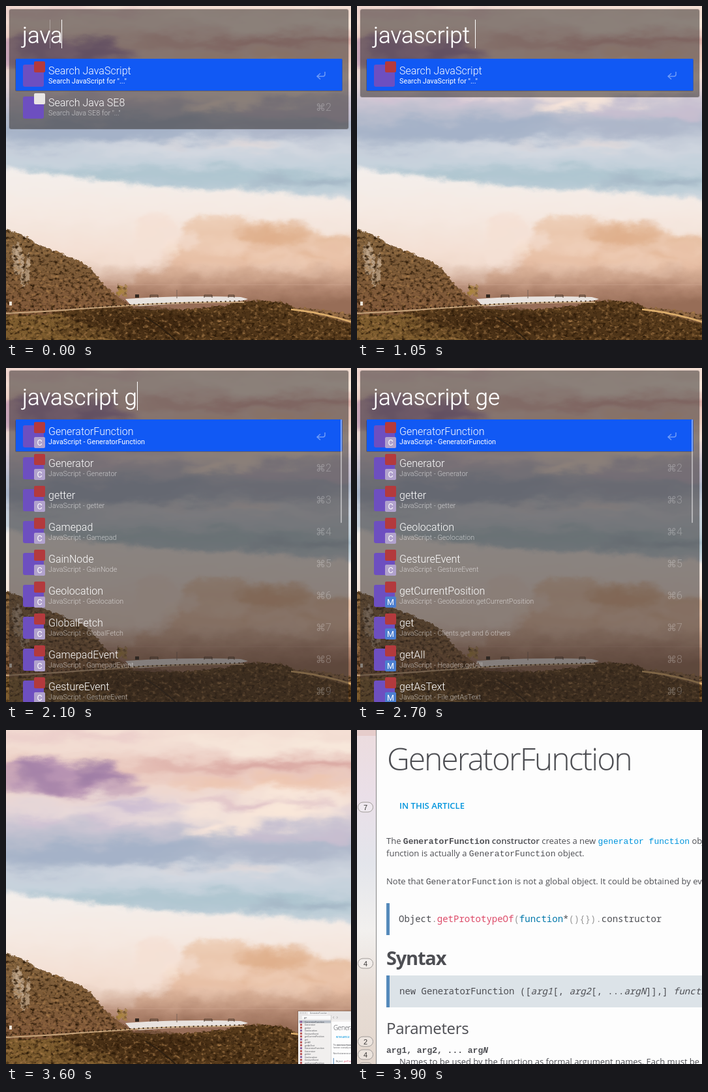
An HTML page for the animation above (6.91 s loop, 529 by 513 pixels).

```html
<!DOCTYPE html>
<html lang="en">
<head>
<meta charset="utf-8">
<title>Launcher search</title>
<style>
  html, body { margin: 0; width: 529px; height: 513px; overflow: hidden; background: #f5ebe4; }
  svg { position: absolute; left: 0; top: 0; width: 529px; height: 513px; overflow: hidden; }
  #wallpaper { will-change: transform; }
  text { white-space: pre; }
  .ui { font-family: Roboto, "Liberation Sans", sans-serif; font-weight: 300; fill: #fff; }
  .doc { font-family: "Open Sans", "Noto Sans", sans-serif; fill: #4d4e53; }
  .mono { font-family: "Liberation Mono", monospace; }
  .code { font-family: "Noto Sans Mono", "DejaVu Sans Mono", monospace; font-size: 14px; }
  .link { fill: #0095dd; }
</style>
</head>
<body>
<svg id="wallpaper" viewBox="0 0 529 513">
  <defs>
    <filter id="cloud" x="-60" y="-60" width="650" height="640" filterUnits="userSpaceOnUse" color-interpolation-filters="sRGB">
      <feGaussianBlur in="SourceGraphic" stdDeviation="4" result="soft"/>
      <feTurbulence type="fractalNoise" baseFrequency=".016 .04" numOctaves="4" seed="4" result="noise"/>
      <feDisplacementMap in="soft" in2="noise" scale="30" xChannelSelector="R" yChannelSelector="G"/>
    </filter>
    <filter id="haze" x="-40" y="200" width="610" height="340" filterUnits="userSpaceOnUse" color-interpolation-filters="sRGB">
      <feGaussianBlur in="SourceGraphic" stdDeviation="3" result="soft"/>
      <feTurbulence type="fractalNoise" baseFrequency=".03 .05" numOctaves="4" seed="9" result="noise"/>
      <feDisplacementMap in="soft" in2="noise" scale="18" xChannelSelector="R" yChannelSelector="G"/>
    </filter>
    <filter id="scrub" x="-20" y="320" width="570" height="220" filterUnits="userSpaceOnUse" color-interpolation-filters="sRGB">
      <feTurbulence type="fractalNoise" baseFrequency=".16 .22" numOctaves="4" seed="8" result="noise"/>
      <feDisplacementMap in="SourceGraphic" in2="noise" scale="7" xChannelSelector="R" yChannelSelector="G" result="shape"/>
      <feColorMatrix in="noise" values="0 0 0 0 .17  0 0 0 0 .1  0 0 0 0 .03  3 0 0 0 -1.45"/>
      <feComposite in2="shape" operator="in" result="dark"/>
      <feColorMatrix in="noise" values="0 0 0 0 .68  0 0 0 0 .5  0 0 0 0 .3  0 2.6 0 0 -1.4"/>
      <feComposite in2="shape" operator="in" result="light"/>
      <feMerge><feMergeNode in="shape"/><feMergeNode in="dark"/><feMergeNode in="light"/></feMerge>
    </filter>
  </defs>
</svg>
<svg id="stage" viewBox="0 0 529 513"></svg>

<script>
const LOOP = 6910;
const wallpaper = document.getElementById('wallpaper');
const stage = document.getElementById('stage');

const times = (n, fn) => Array.from({ length: n }, (_, i) => fn(i)).join('');
const rect = (x, y, w, h, fill, more = '') =>
  `<rect x="${x}" y="${y}" width="${w}" height="${h}" fill="${fill}" ${more}/>`;
const path = (d, fill, more = '') => `<path d="${d}" fill="${fill}" ${more}/>`;
const line = (d, color, width = 1, more = '') =>
  path(d, 'none', `stroke="${color}" stroke-width="${width}" ${more}`);
const label = (x, y, size, content, more = '') =>
  `<text x="${x}" y="${y}" font-size="${size}" ${more}>${content}</text>`;
const span = (content, more) => `<tspan ${more}>${content}</tspan>`;

// Evenly spaced color stops from y1 to y2.
const fade = (id, y1, y2, ...colors) =>
  `<linearGradient id="${id}" x2="0" y1="${y1}" y2="${y2}" gradientUnits="userSpaceOnUse">${
    colors.map((c, i) => `<stop offset="${i / (colors.length - 1)}" stop-color="${c}"/>`).join('')}</linearGradient>`;

let seed = 11;
const random = () => (seed = seed * 16807 % 2147483647) / 2147483647;
const around = (center, spread) => center + spread * (random() * 2 - 1);

// A drift of random streaks inside the ellipse-like area (x ± w, y ± h).
const drift = (color, x, y, w, h, count = 12, opacity = .6) => times(count, () =>
  `<ellipse cx="${around(x, w * .75)}" cy="${around(y, h * .7)}" rx="${w * around(.3, .12)}" ry="${h * around(.4, .15)}"
    fill="${color}" opacity="${opacity}"/>`);

function drawSky() {
  return `${fade('sky', 0, 300, '#f4dfd4', '#f2dcd2', '#e7c2b8', '#f0d8ce', '#e6d6d8',
      '#c9c4d2', '#aeb8ca', '#c6cdd9', '#c8d3dd', '#b2c7d2', '#ccd6de')}
    <g filter="url(#cloud)">
      ${rect(-60, -60, 650, 420, 'url(#sky)')}
      ${drift('#ebcdca', 110, 10, 130, 12)}
      ${drift('#f9eadc', 400, 24, 150, 14)}
      ${drift('#d6a09b', 390, 56, 190, 9)}
      ${drift('#b692b2', 90, 72, 140, 30, 16)}
      ${drift('#9f7da5', 85, 72, 90, 22, 8)}
      ${drift('#efc3aa', 410, 82, 140, 10)}
      ${drift('#fae8db', 400, 115, 150, 30, 16)}
      ${drift('#d6b3c0', 390, 114, 110, 9, 6)}
      ${drift('#cdbfd4', 110, 128, 150, 18, 14)}
      ${drift('#ecdcda', 160, 128, 140, 14, 10)}
      ${drift('#fbe8da', 330, 150, 60, 13)}
      ${drift('#c9bed1', 450, 165, 100, 14)}
      ${drift('#a5b2c8', 130, 188, 180, 28, 18)}
      ${drift('#adb6ca', 400, 190, 160, 11)}
      ${drift('#d4d9e1', 340, 222, 230, 13, 14)}
      ${drift('#ecdcd7', 330, 214, 110, 5, 6)}
      ${drift('#b0c6d1', 280, 258, 290, 10, 14)}
      ${drift('#a2b2c4', 440, 267, 90, 9, 8)}
    </g>`;
}

function drawMist() {
  return `${fade('mist', 250, 440, '#f4efec', '#f5eae3', '#f4e0d4', '#ecd0bf')}
    ${fade('slope', 320, 430, '#eed0ba', '#eac6ac', '#e8c0a6', '#d2a88f')}
    ${fade('valley', 395, 455, '#b58a7400', '#c097807a', '#ac806ad8', '#976d57')}
    <g filter="url(#haze)">
      ${path('M-40 249Q100 258 190 271T360 284T570 304V540H-40Z', 'url(#mist)')}
      ${path('M150 470L290 322Q350 320 400 330Q460 338 570 371V480Z', 'url(#slope)')}
      ${drift('#f6e2d5', 245, 362, 60, 48, 14)}
      ${drift('#dfae8c', 440, 370, 100, 36, 14, .4)}
      ${drift('#f0d3bf', 400, 385, 130, 32, 8, .4)}
      ${rect(100, 395, 470, 120, 'url(#valley)')}
    </g>`;
}

function drawGround() {
  const bench = (x, w) => line(`M${x} 444h${w}v4m${-w} 0v-4m0 2h${w}`, '#4f3a2c');
  return `${fade('hill', 343, 470, '#83643f', '#7c5a37', '#82593a')}
    <g filter="url(#scrub)">
      ${path('M440 463Q490 465 540 476V530H440Z', '#8e6743')}
      ${path('M-20 340L0 343Q28 349 44 364Q76 376 106 389Q130 398 143 420Q164 444 195 462L180 480H-20Z', 'url(#hill)')}
      ${path('M70 471Q130 460 200 465T340 459Q385 447 432 457L445 468L540 490V530H70Z', '#563a1b')}
      ${path('M-20 474H80Q110 486 160 500L185 530H-20Z', '#7d5c2e')}
      ${drift('#402a12', 290, 488, 190, 24, 14, .35)}
      ${drift('#c2a98f', 24, 398, 16, 36, 9, .7)}
      ${drift('#a8843c', 176, 437, 10, 10, 8)}
    </g>
    ${line('M150 428H529', '#d0aa94', 1, 'opacity=".5"')}
    ${path('M183 450Q270 444 360 447L371 450Q360 455 312 456Q250 457 205 461L190 458Z', '#e8e2de')}
    ${line('M0 472Q70 469 115 465L190 460Q250 455 365 455', '#c7a57c', 2)}
    ${line('M0 468Q70 466 115 463L190 459Q250 456 365 453', '#3b2815', 2, 'stroke-dasharray="2 5"')}
    ${line('M437 466Q480 470 529 485', '#dfb06d', 2.5)}
    ${line('M214 478Q240 494 260 513', '#2d1f10', 2)}
    ${line('M262 436v13', '#7b6558')}
    ${rect(198, 443, 6, 5, '#32271f')}${rect(5, 454, 4, 6, '#eee5d8')}
    ${bench(221, 12)}${bench(304, 12)}${bench(341, 9)}`;
}

wallpaper.insertAdjacentHTML('beforeend', drawSky() + drawMist() + drawGround());

const badge = (x, y, fill, letter = '') => rect(x, y, 17, 17, fill, 'rx="2"') +
  (letter && label(x + 8.5, y + 13, 12.5, letter, 'text-anchor="middle" font-weight="400"'));

function drawRow(top, i, { title, sub, tag = '#b33a3d', kind }) {
  const y = top + i * 49;
  const selected = i === 0;
  const highlight = rect(14, y + 1, 502, 49, '#1b1a2a', 'opacity=".3" rx="2"') + rect(15, y, 500.5, 49, '#1159f4', 'rx="1"');
  const hint = selected
    ? line(`M489 ${y + 20}v4q0 3-3 3H477m5-4.5-5 4.5 5 4.5`, '#fff', 1.5, 'opacity=".4"')
    : label(475, y + 30.5, 16, `<tspan font-family="DejaVu Sans, sans-serif" font-size="15">⌘</tspan>${i + 1}`, 'opacity=".27"');
  return (selected ? highlight : '') +
    rect(26, y + 9, 32, 34, '#6d4fc0', 'rx="3"') +
    badge(43, y + 4, tag) +
    (kind ? badge(43, y + 27, kind === 'C' ? '#b1a2cd' : '#4c7fd0', kind) : '') +
    label(65, y + 23.5, 16, title) +
    label(65, y + 37.5, 10.8, sub, selected ? 'font-weight="400"' : 'opacity=".62"') + hint;
}

function drawPanel({ query, caret, ghost, top, height, rows, scroll }) {
  const bar = (x, opacity) => x ? rect(x, 21, 1, 44, '#fff', `opacity="${opacity}"`) : '';
  return `<g class="ui">
    ${rect(4, top - 1, 522, height + 2, '#1e1a1a', 'opacity=".1" rx="4"')}
    ${rect(5, top, 520, height, '#2e2a29', 'opacity=".48" rx="3"')}
    ${label(25, 56.5, 35, query, 'stroke="#fff" stroke-width=".3"')}
    ${bar(ghost, .3)}${bar(caret, 1)}
    ${rows.map((row, i) => drawRow(top === 4 ? 79 : 81, i, row)).join('')}
    ${scroll ? rect(513, 79, 2, 159, '#fff', 'opacity=".45" rx="1"') : ''}
  </g>`;
}

function drawArticle() {
  const punct = s => span(s, 'fill="#999"');
  const italic = s => span(s, 'font-style="italic"');
  const name = (more = '') => span('GeneratorFunction', `class="mono" ${more}`);
  return `<g class="doc">
    ${rect(30, 0, 499, 513, '#fdfdfd')}
    ${label(46, 62, 48, 'GeneratorFunction', 'font-weight="300" letter-spacing="-2"')}
    ${label(65, 121, 13, 'IN THIS ARTICLE', 'font-weight="600" class="link"')}
    ${label(45, 175, 13, `The ${name('font-weight="700"')}${span(' constructor', 'font-weight="600"')} creates a new ${span('generator function', 'class="mono link"')} object. A`)}
    ${label(45, 194, 13, `function is actually a ${name()} object.`)}
    ${label(45, 237, 13, `Note that ${name()} is not a global object. It could be obtained by evaluating`)}
    ${rect(45, 266, 5, 49, '#558abb')}
    ${label(64, 295, 14, `Object${punct('.')}${span('getPrototypeOf', 'fill="#dd4a68"')}${punct('(')}${span('function', 'fill="#0077aa"')}*${punct('(){}).')}constructor`, 'class="code"')}
    ${label(45, 361, 29, 'Syntax', 'font-weight="700" letter-spacing="-1.2"')}
    ${rect(45, 377, 484, 49, '#dce3e8')}${rect(45, 377, 5, 49, '#558abb')}
    ${label(65, 406, 14, `new GeneratorFunction ([${italic('arg1')}[, ${italic('arg2')}[, ...${italic('argN')}]],] ${italic('functionBody')})`, 'class="code"')}
    ${label(45, 467, 24, 'Parameters', 'letter-spacing="-.3"')}
    ${label(45, 496, 13, `arg1, arg2, ... arg${italic('N')}`, 'class="mono" font-weight="700"')}
    ${label(65, 514, 13, 'Names to be used by the function as formal argument names. Each must be')}
  </g>`;
}

function drawReader(tinted) {
  const countByLine = { 0: 7, 12: 4, 18: 2, 19: 4, 20: 3 };
  const counter = ([row, n]) => {
    const y = 118.5 + row * 20;
    return rect(1.5, y - 7.5, 23, 15, '#fff', 'fill-opacity=".3" stroke="#a09b98" rx="7.5"') +
      label(13, y + 4, 11, n, 'text-anchor="middle" fill="#3c3a39" font-family="Liberation Sans, sans-serif"');
  };
  return fade('tint', 0, 513, '#ecdcde', '#eadfe8', '#e3e5eb', '#f2f0ee', '#e7dcd4', '#e3d7ce') +
    rect(0, 0, 30, 513, tinted ? 'url(#tint)' : '#efeeee') +
    (tinted ? rect(0, 0, 29, 9, '#e6cdcb') : '') +
    Object.entries(countByLine).map(counter).join('') +
    drawArticle() + rect(29, 0, 1, 513, '#858585');
}

function drawOpening() {
  return `${rect(447, 431, 83, 83, '#000', 'opacity=".18"')}
    ${rect(448, 432, 82, 82, '#f1efee')}
    <g transform="translate(492.3 448) scale(.21)">${drawArticle()}</g>
    ${rect(448, 432, 81, 13, '#e9e7e7')}
    ${rect(463, 433, 30, 4, '#f8f8f8')}
    ${times(3, i => `<circle cx="${452 + i * 3.5}" cy="434.5" r="1" fill="#c9c7c6"/>`)}
    <g class="doc">
      ${label(466, 436, 3, 'GeneratorFunction')}
      ${rect(454, 439, 44, 5, '#fafafa')}${label(457, 443, 4, 'ge')}
      ${rect(449, 446, 49, 4.3, '#b9bfc8')}
      ${times(15, i => rect(451, 446.7 + i * 4.5, 3, 3, i % 3 ? '#bb5555' : '#8a5f9d') +
        label(458, 449.6 + i * 4.5, 3.4, matchesGe[i % matchesGe.length].title))}
    </g>
    ${line('M498.5 438V513', '#c8c6c5', .7)}
    ${line('M503 440l-1.5 1.5 1.5 1.5m4-3 1.5 1.5-1.5 1.5', '#888', .6)}`;
}

const searchJs = sub => ({ title: 'Search JavaScript', sub });
const searchJava = { title: 'Search Java SE8', sub: 'Search Java SE8 for "..."', tag: '#e9e6e4' };
const entry = (title, kind, path) => ({ title, kind, sub: `JavaScript - ${path}` });
const types = names => names.split(' ').map(name => entry(name, 'C', name));

const matchesG = types('GeneratorFunction Generator getter Gamepad GainNode Geolocation GlobalFetch GamepadEvent GestureEvent');
const matchesGe = [
  ...types('GeneratorFunction Generator getter Geolocation GestureEvent'),
  entry('getCurrentPosition', 'M', 'Geolocation.getCurrentPosition'),
  entry('get', 'M', 'Clients.get and 6 others'),
  entry('getAll', 'M', 'Headers.getAll'),
  entry('getAsText', 'M', 'File.getAsText'),
];

const java = { query: 'java', ghost: 67, top: 5, height: 184, rows: [searchJs('Search JavaScript for "..."'), searchJava] };
const javascript = { query: 'javascript ', top: 5, height: 135, rows: [searchJs('Search JavaScript for "..."')] };
const typedG = { ...javascript, query: 'javascript g', ghost: 181, rows: [searchJs('Searching for "g"')] };
const listG = { query: 'javascript g', top: 4, height: 520, rows: matchesG, scroll: true };
const listGe = { ...listG, query: 'javascript ge', rows: matchesGe };
const panel = (state, caret) => drawPanel({ ...state, caret });

const scenes = [
  [0, panel(java, 85)],
  [450, panel(java)],
  [1050, panel(javascript, 181)],
  [1650, panel(javascript)],
  [1950, panel(typedG, 201)],
  [2100, panel(listG, 201)],
  [2250, panel(listGe, 219)],
  [2700, panel(listGe)],
  [3300, panel(listGe, 219)],
  [3600, drawOpening()],
  [3750, drawReader(false)],
  [3900, drawReader(true)],
];

let shown = null;
function render(t) {
  const scene = scenes.findLast(([start]) => start <= t);
  if (scene === shown) return;
  shown = scene;
  stage.innerHTML = scene[1];
}

const started = performance.now();
function tick() {
  render((performance.now() - started) % LOOP);
  requestAnimationFrame(tick);
}
tick();
</script>
</body>
</html>
```
